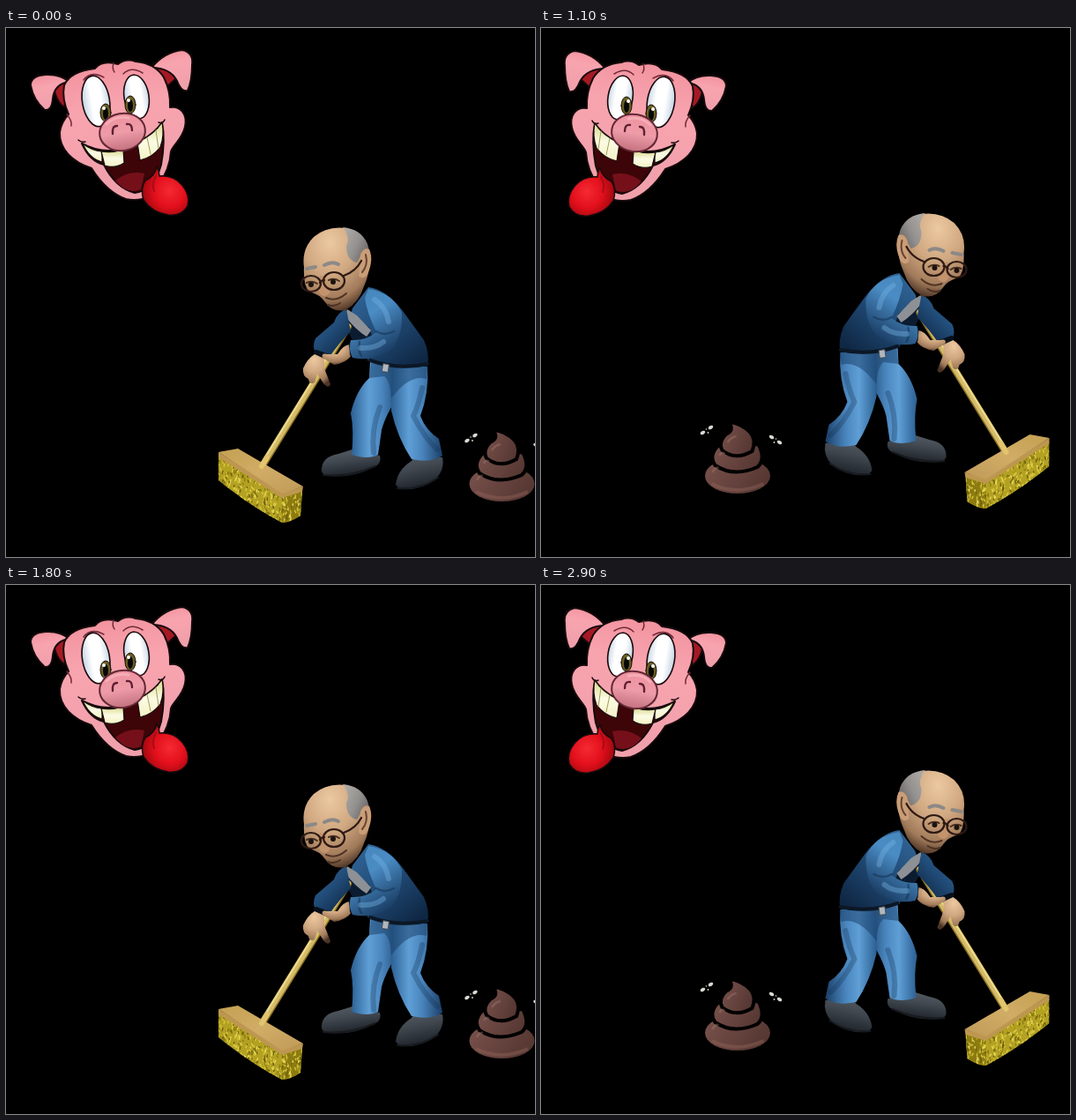
Animation, 600 px wide and 600 px high, one loop 3000 ms. Source, as an HTML page:

```html
<!DOCTYPE html>
<html lang="en">
<head>
<meta charset="utf-8">
<title>Sweeping</title>
<style>
  html, body { margin: 0; width: 100%; height: 100%; overflow: hidden; background: #000; }
  svg { display: block; width: 100%; height: 100%; }
</style>
</head>
<body>
<svg viewBox="0 0 600 600">
  <defs>
    <linearGradient id="pink" x2=".2" y2="1">
      <stop offset="0" stop-color="#f08f9b"/><stop offset=".4" stop-color="#f8a4af"/><stop offset="1" stop-color="#f0a0ab"/>
    </linearGradient>
    <linearGradient id="snout" x2="0" y2="1">
      <stop offset="0" stop-color="#ee929f"/><stop offset=".5" stop-color="#ee9ca8"/><stop offset="1" stop-color="#c4717f"/>
    </linearGradient>
    <linearGradient id="eye">
      <stop offset="0" stop-color="#c4d4e4"/><stop offset=".35" stop-color="#fff"/><stop offset=".7" stop-color="#fff"/><stop offset="1" stop-color="#cbd8e6"/>
    </linearGradient>
    <linearGradient id="tooth" x2="0" y2="1">
      <stop offset="0" stop-color="#d9d88c"/><stop offset=".5" stop-color="#fbfbe4"/><stop offset="1" stop-color="#f4f2c5"/>
    </linearGradient>
    <radialGradient id="tongue" cx=".6" cy=".5" r=".6">
      <stop offset="0" stop-color="#f52a33"/><stop offset=".55" stop-color="#e3101c"/><stop offset="1" stop-color="#a0080f"/>
    </radialGradient>
    <radialGradient id="skin" cx=".4" cy=".18" r=".85">
      <stop offset="0" stop-color="#ecc9a0"/><stop offset=".45" stop-color="#d0a881"/><stop offset=".8" stop-color="#a17a5a"/><stop offset="1" stop-color="#4b3325"/>
    </radialGradient>
    <linearGradient id="hair" x2="1" y2=".6">
      <stop offset="0" stop-color="#b3aeaa"/><stop offset=".6" stop-color="#93918f"/><stop offset="1" stop-color="#6a6766"/>
    </linearGradient>
    <linearGradient id="jacket" x2=".8" y2="1">
      <stop offset="0" stop-color="#34699a"/><stop offset=".5" stop-color="#214c78"/><stop offset="1" stop-color="#0f2744"/>
    </linearGradient>
    <linearGradient id="sleeve" x2=".5" y2="1">
      <stop offset="0" stop-color="#4585ba"/><stop offset=".45" stop-color="#4a8cc4"/><stop offset="1" stop-color="#1c4068"/>
    </linearGradient>
    <linearGradient id="leg">
      <stop offset="0" stop-color="#2b5f92"/><stop offset=".35" stop-color="#5f9fd6"/><stop offset=".6" stop-color="#4a86be"/><stop offset="1" stop-color="#1b3f68"/>
    </linearGradient>
    <linearGradient id="shoe" x2=".3" y2="1">
      <stop offset="0" stop-color="#586069"/><stop offset=".5" stop-color="#40474f"/><stop offset="1" stop-color="#20252b"/>
    </linearGradient>
    <linearGradient id="wood" x2="1" y2="1">
      <stop offset="0" stop-color="#c4a052"/><stop offset=".5" stop-color="#d0ac66"/><stop offset="1" stop-color="#c09a58"/>
    </linearGradient>
    <linearGradient id="brown" x2="1" y2=".4">
      <stop offset="0" stop-color="#7a534d"/><stop offset=".5" stop-color="#694540"/><stop offset="1" stop-color="#573833"/>
    </linearGradient>
    <clipPath id="bristleShape"><path d="M241 486 L313 532 L336 525 L334 553 Q324 560 313 561 Q277 542 241 513Z"/></clipPath>
  </defs>
  <rect width="600" height="600"/>

  <g id="pig" stroke="#160a0c" stroke-width="2" stroke-linejoin="round" stroke-linecap="round">
    <path fill="#a51924" d="M54 57 Q62 52 73 62 L66 90 Q53 80 54 57Z M163 46 Q176 32 190 31 L192 58 L181 68Z"/>
    <path fill="url(#pink)" d="M72 61 Q61 52 45 53 Q28 54 28 65 Q31 82 44 93 Q52 94 53 80 Q55 63 72 61Z"/>
    <path fill="url(#pink)" d="M165 45 Q180 27 200 25 Q213 28 211 42 Q211 60 206 71 Q199 73 194 60 Q186 45 165 45Z"/>
    <path fill="url(#pink)" d="M66 65 Q73 49 101 46 Q109 36 127 41 Q136 34 147 38 Q169 40 179 56 Q187 72 186 90 C198 88 206 98 203 112 C200 126 190 132 187 140 Q186 160 172 180 Q160 199 136 194 Q114 186 97 159 C76 152 60 138 61 118 Q63 106 71 98 Q63 80 66 65Z"/>
    <g fill="none" stroke="#742a38" stroke-width="1.5"><path d="M88 59 Q96 48 111 56 M133 52 Q142 43 155 51 M122 40 Q120 46 123 50 M69 98 Q75 105 74 111"/></g>
    <ellipse cx="102" cy="83" rx="15.5" ry="29" transform="rotate(-9 102 83)" fill="url(#eye)" stroke-width="1.6"/>
    <ellipse cx="148" cy="78" rx="14" ry="25" transform="rotate(-9 148 78)" fill="url(#eye)" stroke-width="1.6"/>
    <g fill="#696021" stroke-width="1"><ellipse cx="113" cy="96" rx="6" ry="10"/><ellipse cx="141" cy="87" rx="6" ry="10"/></g>
    <g fill="#080806" stroke="none"><ellipse cx="113" cy="97" rx="3" ry="7"/><ellipse cx="141" cy="88" rx="3" ry="7"/></g>
    <g fill="#fff" stroke="none"><circle cx="111" cy="91" r="2"/><circle cx="139" cy="82" r="2"/></g>
    <path fill="#3d0508" d="M86 131 Q119 149 154 127 Q169 119 177 107 Q181 128 176 155 Q168 184 146 187 Q124 181 111 155 Q95 151 86 131Z"/>
    <path fill="#75101a" stroke="none" d="M124 173 Q139 161 157 165 L153 183 Q138 190 124 173Z"/>
    <g fill="url(#tooth)" stroke-width="1.2">
      <path d="M87 131 Q97 139 109 140 L109 152 Q94 148 87 131Z"/>
      <path d="M108 140 Q120 142 133 138 L134 153 Q123 160 112 156Z"/>
      <path d="M149 130 Q169 120 177 107 Q180 122 175 135 Q166 147 152 150Z"/>
    </g>
    <path d="M160 124 L164 143 M170 116 L173 137" fill="none" stroke="#a39d5a" stroke-width="1"/>
    <path fill="none" d="M82 127 Q85 130 90 129 M173 107 Q178 109 180 104" stroke-width="1.5"/>
    <ellipse cx="132" cy="118" rx="26" ry="21" transform="rotate(-10 132 118)" fill="url(#snout)" stroke="#622735"/>
    <path d="M121 120 Q120 111 126 111 M137 109 Q143 108 143 116" fill="none" stroke="#5e2030" stroke-width="2.4"/>
    <path d="M114 109 Q124 99 139 102" fill="none" stroke="#ffd2d5" stroke-width="3" opacity=".4"/>
    <path fill="url(#tongue)" stroke-width="1.5" d="M171 157 Q174 162 174 168 C196 166 210 186 206 202 Q199 214 184 212 Q165 209 156 195 Q152 182 158 173 Q169 168 171 157Z"/>
    <path d="M170 168 Q165 177 168 185" fill="none" stroke="#a80c17"/>
  </g>

  <g id="sweeper" stroke-linejoin="round" stroke-linecap="round">
    <path fill="url(#shoe)" d="M358 500 Q359 486 377 483 L393 478 L424 485 Q427 495 415 499 Q393 511 365 508 Q357 506 358 500Z"/>
    <path fill="url(#shoe)" d="M442 518 Q444 501 460 491 L466 483 L495 487 Q498 501 487 512 Q471 525 447 523Z"/>
    <path d="M360 507 Q389 510 419 497 M444 522 Q470 524 490 510" fill="none" stroke="#171b20" stroke-width="2"/>
    <path fill="url(#leg)" d="M413 378 L450 383 L446 415 Q430 440 426 456 L422 484 Q410 490 392 484 Q395 456 391 437 Q397 411 412 397Z"/>
    <path fill="url(#leg)" d="M440 381 L478 384 Q480 414 470 440 Q476 456 491 466 L495 485 Q482 494 460 489 Q444 465 437 434 Q435 405 440 381Z"/>
    <path fill="#173c66" opacity=".5" d="M414 380 L478 384 L477 398 Q458 392 437 420 Q436 400 429 395 L412 397Z"/>
    <path d="M424 430 Q414 455 417 482 M472 408 Q468 428 462 440 Q474 464 489 478" fill="none" stroke="#12304f" stroke-width="6" opacity=".3"/>

    <path fill="url(#jacket)" d="M393 318 Q388 330 392 348 L413 367 Q408 375 411 378 Q445 390 478 383 Q481 370 474 354 L450 321 Q432 297 411 294Z"/>
    <path fill="#0c1c30" d="M388 322 L412 340 L416 352 L394 356 L386 340Z"/>
    <path fill="#8d9195" d="M387 319 L398 326 L414 343 L409 350 Q396 342 384 326Z"/>
    <path d="M413 377 Q445 388 478 381" fill="none" stroke="#0c1725" stroke-width="4"/>
    <rect x="427" y="381" width="7" height="9" rx="1" fill="#b1b7bc" stroke="#3f4c57" transform="rotate(8 430 385)"/>
    <path d="M388 339 L290 498" stroke="#8f7428" stroke-width="8"/>
    <path d="M388 338 L290 497" stroke="#d4bb67" stroke-width="6"/>
    <path d="M386 338 L289 495" stroke="#eddc91" stroke-width="2"/>
    <path fill="url(#jacket)" d="M386 319 Q376 322 372 334 L351 352 Q346 363 353 371 L367 373 Q377 358 391 344Z"/>
    <path d="M352 368 L366 373" stroke="#07101a" stroke-width="6"/>
    <path fill="url(#skin)" d="M350 370 L361 375 L361 386 L368 404 Q366 410 360 403 L353 392 L350 402 Q344 405 343 398 Q336 395 337 386 Q342 375 350 370Z"/>
    <path fill="url(#skin)" d="M390 359 L392 371 Q386 380 372 382 L359 374 Q357 368 365 370 L376 370 Q383 359 390 359Z"/>
    <path d="M391 358 L392 370" stroke="#07101a" stroke-width="4"/>
    <path fill="url(#sleeve)" d="M411 296 Q438 300 449 323 Q450 349 438 364 Q418 379 393 374 Q388 365 391 354 Q408 355 420 345 Q409 322 407 306Z"/>
    <path d="M420 344 Q429 350 440 344 M401 356 Q399 365 403 372" fill="none" stroke="#163657" stroke-width="2.5" opacity=".6"/>
    <path d="M418 308 Q431 316 434 333 M402 363 Q418 364 428 356" fill="none" stroke="#76b2e2" stroke-width="6" opacity=".4"/>

    <path fill="url(#skin)" d="M338 271 Q335 251 349 237 Q364 224 386 227 Q406 232 411 252 Q415 274 406 293 Q400 312 385 320 Q370 323 362 311 Q356 302 344 299 Q337 293 338 271Z"/>
    <path fill="url(#hair)" d="M382 226 Q403 228 410 245 L413 256 Q406 250 402 259 L398 266 Q386 264 386 247 Q391 238 382 226Z"/>
    <path fill="#c99d77" d="M402 257 Q406 248 412 251 Q417 262 411 277 Q407 287 400 281Z"/>
    <path d="M408 257 Q411 269 404 277" fill="none" stroke="#664431" stroke-width="2"/>
    <path d="M341 273 L351 271 M361 269 Q370 264 377 268" stroke="#8c8987" stroke-width="4" fill="none"/>
    <path fill="#c3936d" d="M356 281 Q363 281 366 292 Q371 303 360 304 Q352 301 356 291Z"/>
    <path d="M363 306 Q375 311 386 301 M365 314 Q372 317 379 312" fill="none" stroke="#4e3324" stroke-width="2"/>
    <g fill="none" stroke="#2e1a14" stroke-width="2.2">
      <ellipse cx="346" cy="290" rx="11" ry="9"/><ellipse cx="372" cy="287" rx="12" ry="10"/>
      <path d="M356 289 Q359 285 361 286 M383 281 Q397 276 403 264"/>
    </g>
    <path d="M341 289 Q347 286 353 290 M366 286 Q372 283 378 287" stroke="#4a3021" stroke-width="2" fill="none"/>
    <g fill="#1c130e"><circle cx="346" cy="291" r="3"/><circle cx="371" cy="288" r="3"/></g>

    <g clip-path="url(#bristleShape)">
      <path fill="#b3a122" d="M235 475H340V565H235Z"/>
      <path fill="#8c7b10" d="M313 529L340 520V565H313Z"/>
      <g id="bristles" stroke-width="1.4"></g>
    </g>
    <path fill="#bd9750" d="M241 481 L313 527 L337 520 L336 526 L313 533 L241 487Z"/>
    <path fill="url(#wood)" d="M241 481 L263 477 L337 520 L313 528Z"/>
    <path d="M290 497 L296 487" stroke="#e1c46d" stroke-width="6"/>
  </g>

  <g id="pile">
    <ellipse cx="562.5" cy="517" rx="37" ry="20" fill="url(#brown)"/>
    <path d="M533 526 Q561 540 592 526" fill="none" stroke="#93665d" stroke-width="4" opacity=".4"/>
    <path fill="url(#brown)" stroke="#000" stroke-width="4" d="M541 482 Q529 494 537 505 Q558 519 585 507 Q595 498 586 481Z"/>
    <path fill="url(#brown)" stroke="#000" stroke-width="4" d="M552 456 Q560 465 549 470 Q540 479 545 488 Q560 500 579 489 Q584 476 577 468 Q567 457 552 456Z"/>
    <path d="M551 479 Q555 473 561 472 M542 494 Q544 489 548 492 M534 513 Q537 507 541 508" fill="none" stroke="#a27b70" stroke-width="2.5" opacity=".4"/>
    <g id="fly" fill="#d9dbd2">
      <ellipse cx="523" cy="468" rx="3" ry="1.9" transform="rotate(-30 523 468)"/>
      <ellipse cx="532" cy="462" rx="3" ry="1.9" transform="rotate(-30 532 462)"/>
      <circle cx="527" cy="464" r=".8"/><circle cx="529" cy="468" r=".9"/>
    </g>
    <use href="#fly" transform="translate(1133 11) scale(-1 1)"/>
  </g>
</svg>
<script>
const byId = id => document.getElementById(id);
const STEP = 100, STEPS = 30, HALF = 15, LEFT_STEPS = 8;

function drawBristles() {
  let seed = 17;
  const random = () => (seed = (seed * 16807) % 2147483647) / 2147483647;
  const colors = ['#d8c63a', '#b5a422', '#6e600e', '#e6d758', '#8d7c15'];
  let marks = '';
  for (let i = 0; i < 700; i++) {
    const x = 241 + random() * 95, y = 485 + random() * 75;
    const dx = random() * 3 - 1.5, dy = 1 + random() * 2.5;
    marks += `<path d="M${x.toFixed(1)} ${y.toFixed(1)}l${dx.toFixed(1)} ${dy.toFixed(1)}" stroke="${colors[i % colors.length]}"/>`;
  }
  byId('bristles').innerHTML = marks;
}

function place(id, transform) {
  byId(id).setAttribute('transform', transform);
}

function render(time) {
  const step = Math.floor(time / STEP) % STEPS;
  const flipped = step % HALF >= LEFT_STEPS;
  place('pig', flipped ? 'translate(238 1) scale(-1 1)' : '');
  place('sweeper', flipped ? 'translate(817.5 -16) scale(-1 1)' : '');
  place('pile', flipped ? 'translate(-339.5 -9)' : '');
}

drawBristles();
render(0);
let start;
requestAnimationFrame(function tick(now) {
  start ??= now;
  render(now - start);
  requestAnimationFrame(tick);
});
</script>
</body>
</html>
```
